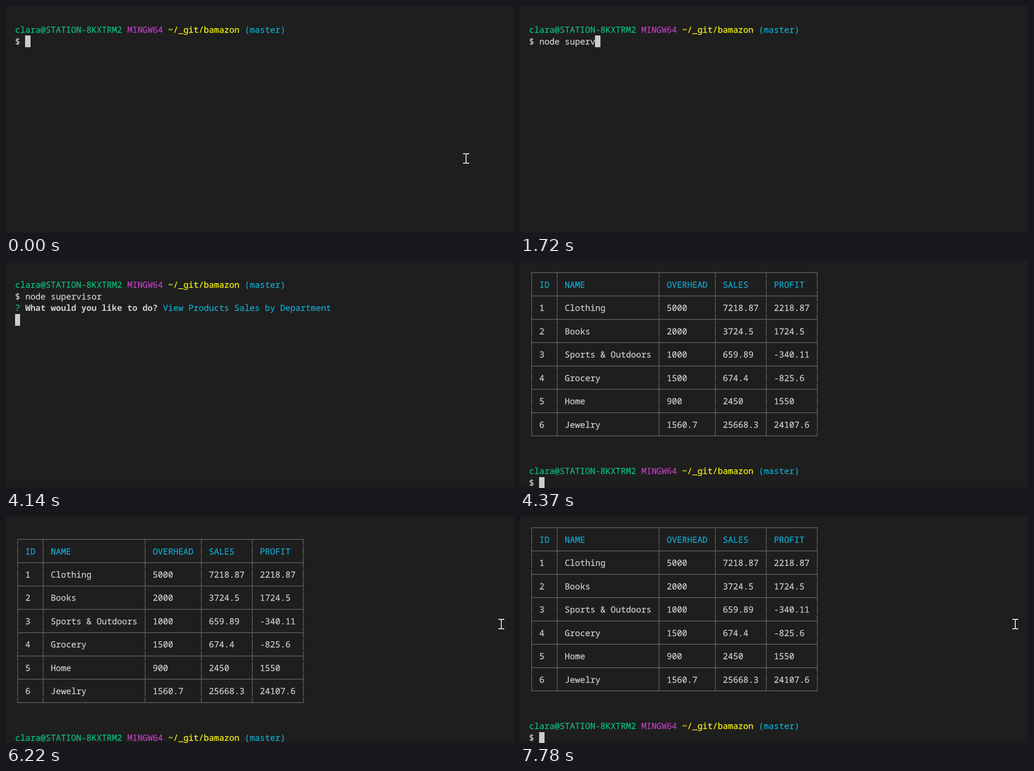
Write an HTML page that moves like this. It is 1118x501 px and loops after 8000 ms.

```html
<!DOCTYPE html>
<html lang="en">
<head>
<meta charset="utf-8">
<title>Terminal session</title>
<style>
  html, body { margin: 0; width: 100%; height: 100%; overflow: hidden; background: #1e1e1e; }
  svg { display: block; width: 100%; height: 100%; }
  text {
    font: 18.71px "Noto Sans Mono", "DejaVu Sans Mono", monospace;
    font-variant-ligatures: none;
    text-rendering: geometricPrecision;
    white-space: pre;
    stroke-width: 0.3;
  }
  text.bold { font-weight: 700; stroke: none; }
</style>
</head>
<body>
<svg viewBox="0 0 1118 501">
  <rect width="1118" height="501" fill="#1e1e1e"/>
  <rect y="497" width="1118" height="4" fill="#1b1b1b"/>
  <g id="screen"></g>
  <path id="mouse" d="M-6.5-10.5H-2L0-9.5L2-10.5H6.5M0-10V10M-6.5 10.5H-2L0 9.5L2 10.5H6.5"
        fill="none" stroke="#fff" stroke-width="1.8"/>
</svg>
<script>
const LOOP = 8000;
const LEFT = 20, TOP = 13.6, COL = 11.226, ROW = 25.73, ROWS = 19;
const FG = '#cccccc', GREEN = '#0dbc79', PINK = '#bc3fbc', YELLOW = '#f2f212',
      CYAN = '#11a8cd', GRAY = '#666666';

const COMMAND = 'node supervisor';
const CHOICE = 'View Products Sales by Department';

// Each entry: [start time, value]
const TYPED = [[0, 0], [600, 1], [750, 2], [840, 3], [930, 4], [1020, 5], [1160, 6], [1220, 7],
  [1390, 8], [1560, 10], [1720, 11], [1850, 12], [1930, 13], [2100, 14], [2250, 15]];
const STAGE = [[0, 'typing'], [2570, 'started'], [2970, 'menu'], [4140, 'chosen'],
  [4280, 'table'], [4370, 'done']];
const SCROLL = [[0, -1], [4280, 2], [4370, 4], [6220, 3], [6300, 2], [6450, 0], [7630, 2], [7780, 4]];
const MOUSE = [[0, [1012.5, 336.5]], [90, [1020.5, 329.5]], [140, null],
  [5610, [1097, 238.5]], [5690, [1090, 238.5]]];

const BORDERS = [0, 5, 25, 36, 46, 56];
const TABLE = [
  ['ID', 'NAME', 'OVERHEAD', 'SALES', 'PROFIT'],
  ['1', 'Clothing', '5000', '7218.87', '2218.87'],
  ['2', 'Books', '2000', '3724.5', '1724.5'],
  ['3', 'Sports & Outdoors', '1000', '659.89', '-340.11'],
  ['4', 'Grocery', '1500', '674.4', '-825.6'],
  ['5', 'Home', '900', '2450', '1550'],
  ['6', 'Jewelry', '1560.7', '25668.3', '24107.6']
];

const screen = document.getElementById('screen');
const mouse = document.getElementById('mouse');

const valueAt = (steps, t) => steps.filter(s => s[0] <= t).pop()[1];
const colX = c => LEFT + c * COL;
const rowY = r => TOP + r * ROW;
const run = (col, str, color = FG, bold = false) => ({ col, str, color, bold });

const PROMPT = [
  run(0, 'clara@STATION-8KXTRM2', GREEN),
  run(22, 'MINGW64', PINK),
  run(30, '~/_git/bamazon', YELLOW),
  run(45, '(master)', CYAN)
];

const question = (color, ...rest) =>
  [run(0, '?', color), run(2, 'What would you like to do?', FG, true), ...rest];

function drawRun(row, { col, str, color, bold }) {
  const safe = str.replace(/&/g, '&amp;').replace(/</g, '&lt;').replace(/>/g, '&gt;');
  return `<text x="${colX(col)}" y="${rowY(row + 0.5) + 6.6}" fill="${color}" stroke="${color}"` +
    `${bold ? ' class="bold"' : ''}>${safe}</text>`;
}

// The block cursor sits on whole pixels.
function drawCursor(row, col) {
  const x = Math.floor(colX(col)), y = Math.round(rowY(row));
  return `<rect x="${x}" y="${y}" width="${Math.round(colX(col + 1)) - x}" height="26" fill="${FG}"/>`;
}

// Border glyphs are shorter than a row, which leaves small gaps between them.
function drawTable(first) {
  const last = TABLE.length * 2;
  let path = '', cells = '';
  for (let i = 0; i <= last; i++) {
    const mid = rowY(first + i + 0.5) - 0.6;
    const y1 = i === 0 ? mid : mid - 11.9;
    const y2 = i === last ? mid : mid + 11.9;
    for (const b of BORDERS) path += `M${colX(b + 0.5)} ${y1}V${y2}`;
    if (i % 2 === 0) {
      path += `M${colX(0.5) - 0.7} ${mid}H${colX(56.5) + 0.7}`;
    } else {
      const color = i === 1 ? CYAN : FG;
      TABLE[(i - 1) / 2].forEach((str, c) => {
        cells += drawRun(first + i, run(BORDERS[c] + 2, str, color));
      });
    }
  }
  return `<path d="${path}" fill="none" stroke="${GRAY}" stroke-width="1.5"/>` + cells;
}

function buildScreen(stage, typed, top) {
  const lines = { 0: PROMPT, 1: [run(0, '$'), run(2, COMMAND.slice(0, typed))] };
  const finished = stage === 'table' || stage === 'done';
  let cursor = null;

  if (stage === 'typing') cursor = [1, 2 + typed];
  if (stage === 'started') cursor = [2, 0];
  if (stage === 'menu') {
    lines[2] = question('#0b9a74', run(28, ' (Use arrow keys)'));
    lines[3] = [run(0, '>', CYAN), run(2, CHOICE, CYAN)];
    lines[4] = [run(2, 'Create Department')];
  }
  if (stage === 'chosen' || finished) lines[2] = question(GREEN, run(29, CHOICE, CYAN));
  if (stage === 'chosen') cursor = [3, 0];
  if (stage === 'table') cursor = [20, 0];
  if (stage === 'done') {
    lines[21] = PROMPT;
    lines[22] = [run(0, '$')];
    cursor = [22, 2];
  }

  let out = finished ? drawTable(4 - top) : '';
  for (const [n, runs] of Object.entries(lines)) {
    const row = n - top;
    if (row >= 0 && row < ROWS) out += runs.map(r => drawRun(row, r)).join('');
  }
  if (cursor && cursor[0] - top < ROWS) out += drawCursor(cursor[0] - top, cursor[1]);
  return out;
}

let shown = '';
function draw(t) {
  const state = [valueAt(STAGE, t), valueAt(TYPED, t), valueAt(SCROLL, t)];
  const key = state.join();
  if (key !== shown) {
    screen.innerHTML = buildScreen(...state);
    shown = key;
  }
  const spot = valueAt(MOUSE, t);
  mouse.setAttribute('visibility', spot ? 'visible' : 'hidden');
  if (spot) mouse.setAttribute('transform', `translate(${spot})`);
}

const start = performance.now();
function tick() {
  draw((performance.now() - start) % LOOP);
  requestAnimationFrame(tick);
}
tick();
</script>
</body>
</html>
```
